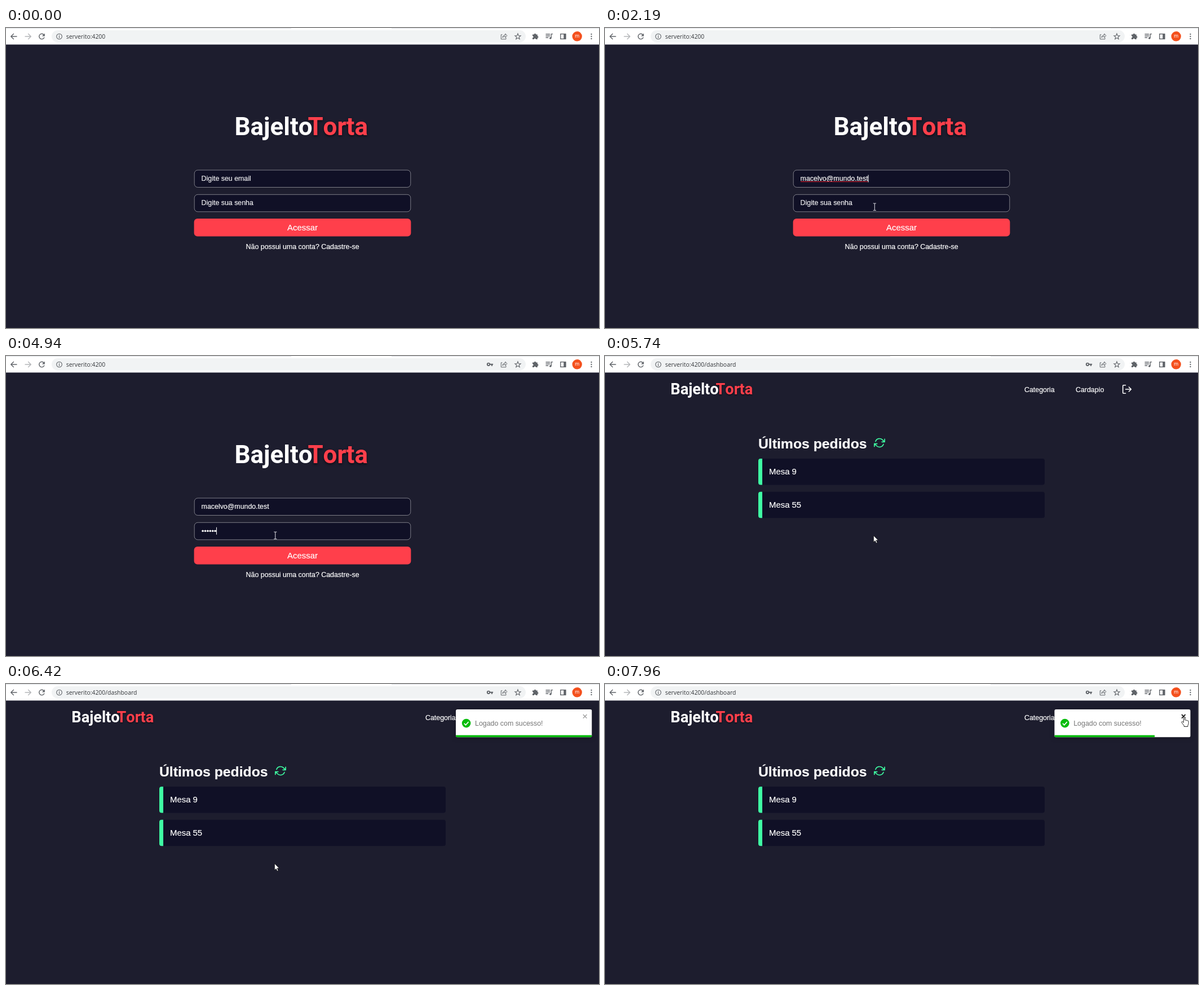
Animation, 1052 px wide and 532 px high, one loop 8000 ms. Source, as an HTML page:

```html
<!DOCTYPE html>
<html lang="pt">
<head>
<meta charset="utf-8">
<title>Login</title>
<style>
html, body { margin: 0; width: 100%; height: 100%; overflow: hidden; background: #1d1d2e; }
svg { display: block; width: 1052px; height: 532px; }
text { font-family: "Liberation Sans", Arial, sans-serif; font-size: 12.4px; fill: #fff; white-space: pre; }
#login > text, #dash > text { stroke: #fff; stroke-width: .2; }
.big { font-size: 14.9px; }
.title { font-size: 24.75px; font-weight: bold; }
.logo text { font: bold 44px Roboto, sans-serif; font-kerning: none; }
.logo .red { fill: #ff3f4b; filter: drop-shadow(0 2px 2px rgba(0,0,0,.6)); }
.url { font-family: "Open Sans", sans-serif; font-size: 10.4px; fill: #33363a; }
.hint { fill: #e6e6ea; }
.line { fill: none; stroke: #5f6368; stroke-width: 1.4; }
.solid { fill: #5f6368; }
.field { fill: #101026; stroke: #8a8a92; stroke-width: .9; }
.row { fill: #101026; }
.toast { filter: drop-shadow(0 1px 4px rgba(0,0,0,.25)); }
</style>
</head>
<body>
<svg viewBox="0 0 1052 532">
  <defs>
    <g id="logo" class="logo">
      <text x="-1.6" y="0">Bajelto</text>
      <text class="red" x="128.4" y="0">Torta</text>
    </g>
    <clipPath id="card"><rect x="798" y="45" width="241.5" height="49.5" rx="3"/></clipPath>
  </defs>
  <rect width="1052" height="532" fill="#1d1d2e"/>

  <g id="login">
    <use href="#logo" x="407" y="190"/>
    <rect class="field" x="334.2" y="252" width="383.6" height="30.5" rx="6"/>
    <rect class="field" x="334.2" y="295.3" width="383.6" height="30.5" rx="6"/>
    <text id="mailHint" class="hint" x="346.6" y="271">Digite seu email</text>
    <text id="mail" x="346.6" y="271"></text>
    <path id="spell" fill="none" stroke="#e0202c"/>
    <text id="passHint" class="hint" x="346.6" y="314.3">Digite sua senha</text>
    <g id="dots" fill="#fff"></g>
    <rect id="caret" width="1" height="13" fill="#fff"/>
    <rect id="button" x="333.6" y="338.1" width="384.8" height="31.3" rx="6"/>
    <text class="big" x="526" y="358.8" text-anchor="middle">Acessar</text>
    <text x="425.6" y="392.3">Não possui uma conta? Cadastre-se</text>
  </g>

  <g id="dash">
    <use href="#logo" transform="translate(117.3 68.3) scale(.617)"/>
    <text x="744" y="64.4">Categoria</text>
    <text x="835" y="64.4">Cardapio</text>
    <path d="M923.5 51.8h-3.6q-1.2 0-1.2 1.2v12q0 1.2 1.2 1.2h3.6M923.5 59h9.7M929.4 55l4 4-4 4" fill="none" stroke="#fff" stroke-width="1.6" stroke-linecap="round" stroke-linejoin="round"/>
    <text class="title" x="272" y="163.5">Últimos pedidos</text>
    <path transform="translate(477 144) scale(.83)" d="M23 4v6h-6M1 20v-6h6M3.51 9a9 9 0 0 1 14.85-3.36L23 10M1 14l4.64 4.36A9 9 0 0 0 20.49 15" fill="none" stroke="#3fffa3" stroke-width="2" stroke-linecap="round" stroke-linejoin="round"/>
    <rect class="row" x="272" y="182" width="508" height="46.5" rx="4"/>
    <rect class="row" x="272" y="240.7" width="508" height="46.5" rx="4"/>
    <path d="M279 182h-3q-4 0-4 4v38.5q0 4 4 4h3zM279 240.7h-3q-4 0-4 4v38.5q0 4 4 4h3z" fill="#3fffa3"/>
    <text class="big" x="291" y="210">Mesa 9</text>
    <text class="big" x="291" y="268.7">Mesa 55</text>
  </g>

  <g id="toast" class="toast">
    <g clip-path="url(#card)">
      <rect x="798" y="45" width="241.5" height="49.5" fill="#fff"/>
      <rect id="bar" x="798" y="90.7" height="3.8" fill="#07bc0c"/>
    </g>
    <circle cx="816.6" cy="69.6" r="7.8" fill="#07bc0c"/>
    <path d="M812.8 69.9l2.7 2.8 5-5.6" fill="none" stroke="#fff" stroke-width="1.6"/>
    <text x="832" y="73.7" style="fill:#757575">Logado com sucesso!</text>
    <path id="close" d="M1023.8 54.1l6.6 6.6m0-6.6l-6.6 6.6" stroke="#000" stroke-width="1.5"/>
  </g>

  <g id="chrome">
    <rect width="1052" height="29.4" fill="#dee1e6"/>
    <rect width="1052" height="29" fill="#fff"/>
    <path d="M0 .5h506M684 .5h368" stroke="#dee1e6"/>
    <rect x="81" y="4" width="841" height="21.5" rx="10.7" fill="#f1f3f4"/>
    <path class="line" d="M19.5 15H9M13.8 10l-5 5 5 5"/>
    <path class="line" d="M33.5 15H44M39.2 10l5 5-5 5" style="stroke:#b4b6b9"/>
    <path class="line" d="M67.2 12A4.7 4.7 0 1 0 68 16.4"/>
    <path class="solid" d="M68.8 9.6v4.9h-4.9z"/>
    <circle class="line" cx="94.5" cy="15" r="4.8" style="stroke-width:1.1"/>
    <path class="line" d="M94.5 14.2v3.5M94.5 12v1.3" style="stroke-width:1.2"/>
    <text id="url" class="url" x="106.8" y="18.5"></text>
    <g id="key">
      <circle class="line" cx="856" cy="14.8" r="2.2" style="stroke-width:1.9"/>
      <path class="line" d="M858.5 14.8h5.6M862 14.8v3" style="stroke-width:2"/>
    </g>
    <path class="line" d="M880.5 11.8h-2.2v8h8.6v-2.6M880.8 17q.6-4.5 5-4.5v-2.4l3 3.5-3 3.4v-2.3q-3.2 0-5 2.3z" style="stroke-width:1"/>
    <path id="star" class="line" style="stroke-width:1.1"/>
    <path class="solid" d="M934 11.4h2.8a1.7 1.7 0 0 1 3.4 0h2.6v2.8a1.7 1.7 0 0 1 0 3.4v2.4h-2.9a1.6 1.6 0 0 0-3.2 0H934v-2.7a1.6 1.6 0 0 0 0-3.2z"/>
    <path class="line" d="M957.5 11h7.5M957.5 14h7.5M957.5 17h4.8M967.2 18V10.6h3"/>
    <circle class="solid" cx="965.8" cy="18" r="1.8"/>
    <rect class="line" x="983.8" y="10.6" width="9" height="8.8"/>
    <rect class="solid" x="989.3" y="10.6" width="4" height="8.8"/>
    <circle cx="1013.2" cy="14.8" r="8.7" fill="#f4511e"/>
    <text x="1013.2" y="17.4" text-anchor="middle" style="font:9px Roboto,sans-serif">m</text>
    <path d="M1038.5 11v.01M1038.5 15v.01M1038.5 19v.01" stroke="#5f6368" stroke-width="2.3" stroke-linecap="round"/>
  </g>

  <g id="cursor">
    <path id="arrow" d="M.5.5v11.6l2.7-2.5 1.9 4.2 1.9-.8-1.9-4.2h3.6z" fill="#fff" stroke="#111" stroke-width=".7"/>
    <path id="beam" transform="translate(.3 .2)" d="M-2.5-6.2h2q.5 0 .5.5 0-.5.5-.5h2M0-6V6M-2.5 6.2h2q.5 0 .5-.5 0 .5.5.5h2" fill="none" stroke="#e4e4ea"/>
    <path id="hand" d="M-1.2 1q0-1.2 1.2-1.2T1.2 1v5q1.2-.8 2.3.4 1.3-.6 2.2.5 2-.2 2 1.6v3.2q0 2-1.3 3.6v2.2H-.2v-1.6l-4-5.2q-.9-1.4.2-2 1-.5 2.1.9l.7.8z" fill="#fff" stroke="#111" stroke-width=".9" stroke-linejoin="round"/>
  </g>
</svg>
<script>
const LOOP = 8000, LAST = 7960, PAGE = 5670;
const MAIL = "macelvo@mundo.test", HOST = "serverito:4200";
const $ = id => document.getElementById(id);
const set = (id, attrs) => { for (const k in attrs) $(id).setAttribute(k, attrs[k]); };
const show = (id, on) => set(id, { visibility: on ? "inherit" : "hidden" });
const clamp = v => Math.max(0, Math.min(1, v));
const within = (t, a, b) => t >= a && t < b;

// time, x, y of the pointer
const MOVES = [
  [130, 747, 433], [520, 491, 274], [990, 491, 274], [1450, 486, 285],
  [1910, 486, 285], [2190, 478, 317], [2330, 478, 317], [2460, 477.5, 318],
  [5670, 477.5, 318], [5740, 476, 318], [6690, 476, 318], [6760, 514, 305],
  [7000, 700, 200], [7220, 900, 84], [7430, 1024, 40], [7600, 1028.5, 58],
  [7820, 1028.5, 58], [7960, 1027.5, 58]
];
const KEYS = [3740, 3940, 4140, 4410, 4680, 4940];

function bezier(x1, y1, x2, y2) {
  const at = (a, b, s) => 3 * a * s * (1 - s) ** 2 + 3 * b * s * s * (1 - s) + s ** 3;
  return p => {
    let lo = 0, hi = 1;
    for (let i = 0; i < 24; i++) {
      const mid = (lo + hi) / 2;
      if (at(x1, x2, mid) < p) lo = mid; else hi = mid;
    }
    return at(y1, y2, lo);
  };
}
const easeOut = bezier(.215, .61, .355, 1), ease = bezier(.25, .1, .25, 1), linear = p => p;

// stops: rows of time followed by values
function track(stops, t, curve = linear) {
  if (t <= stops[0][0]) return stops[0].slice(1);
  for (let i = 1; i < stops.length; i++) {
    const a = stops[i - 1], b = stops[i];
    if (t <= b[0]) {
      const k = curve((t - a[0]) / (b[0] - a[0]));
      return a.slice(1).map((v, j) => v + (b[j + 1] - v) * k);
    }
  }
  return stops[stops.length - 1].slice(1);
}

const ENTER = [[5720, 2322], [6140, -19], [6245, 7.7], [6350, -3.9], [6420, 0]];
const LEAVE = [[7812, 0], [7952, -15.5], [8372, 1548]];

function drawForm(t, x, y) {
  const n = t >= 1780 ? 18 : Math.floor(17 * clamp((t - 960) / 560));
  $("mail").textContent = MAIL.slice(0, n);
  const end = 346.6 + (n ? $("mail").getComputedTextLength() : 0);
  show("mailHint", !n);
  show("spell", within(t, 1780, 2330));
  set("spell", { d: `M347 272.5H${end}` });

  const typed = KEYS.filter(k => t >= k).length;
  show("passHint", !typed);
  [...$("dots").children].forEach((d, i) => d.setAttribute("visibility", i < typed ? "inherit" : "hidden"));

  const inPass = t >= 2330;
  show("caret", t >= 660 && !within(t, 3010, 3540) && t < 5470);
  set("caret", { x: inPass ? 346.6 + 4.4 * typed : end, y: inPass ? 303.7 : 260.5 });
  set("button", { fill: overButton(x, y) && t >= 130 ? "#ff4653" : "#ff3f4b" });
}

const overButton = (x, y) => x > 334 && x < 718 && y > 338 && y < 369;

function pointer(t, x, y) {
  if (t < PAGE) {
    if (overButton(x, y)) return "hand";
    const inField = x > 334 && x < 718 && (within(y, 252, 282.5) || within(y, 295, 326));
    return inField ? "beam" : "arrow";
  }
  if (t < 5740) return "beam";
  return t > 7540 ? "hand" : "arrow";
}

function drawToast(t) {
  show("toast", t >= 6000);
  const [dx] = t < 7812 ? track(ENTER, t, easeOut) : track(LEAVE, t, ease);
  set("toast", { transform: `translate(${dx})` });
  // the countdown halts while the pointer is over the card
  const left = 1 - (Math.min(t, 7220) - 6430) / 3000;
  set("bar", { width: 241.5 * clamp(left) });
  set("close", { opacity: .35 + .65 * clamp((t - 7520) / 300) });
}

function draw(t) {
  t = Math.min(t, LAST);
  const [x, y] = track(MOVES, t), inside = t >= PAGE;
  show("login", !inside);
  show("dash", inside);
  show("key", t >= 3740);
  $("url").textContent = HOST + (inside ? "/dashboard" : "");
  drawForm(t, x, y);
  drawToast(t);
  show("cursor", t >= 130);
  set("cursor", { transform: `translate(${x} ${y})` });
  const kind = pointer(t, x, y);
  for (const id of ["arrow", "beam", "hand"]) show(id, id === kind);
}

KEYS.forEach((_, i) => {
  const dot = document.createElementNS("http://www.w3.org/2000/svg", "circle");
  dot.setAttribute("cx", 349.1 + 4.4 * i);
  dot.setAttribute("cy", 310.2);
  dot.setAttribute("r", 1.8);
  $("dots").append(dot);
});
const star = Array.from({ length: 10 }, (_, i) => {
  const a = Math.PI * (i / 5 - .5), r = i % 2 ? 2.3 : 5.4;
  return (908 + r * Math.cos(a)).toFixed(2) + " " + (15.3 + r * Math.sin(a)).toFixed(2);
});
set("star", { d: "M" + star.join("L") + "Z" });

function tick() {
  draw(performance.now() % LOOP);
  requestAnimationFrame(tick);
}
tick();
</script>
</body>
</html>
```
